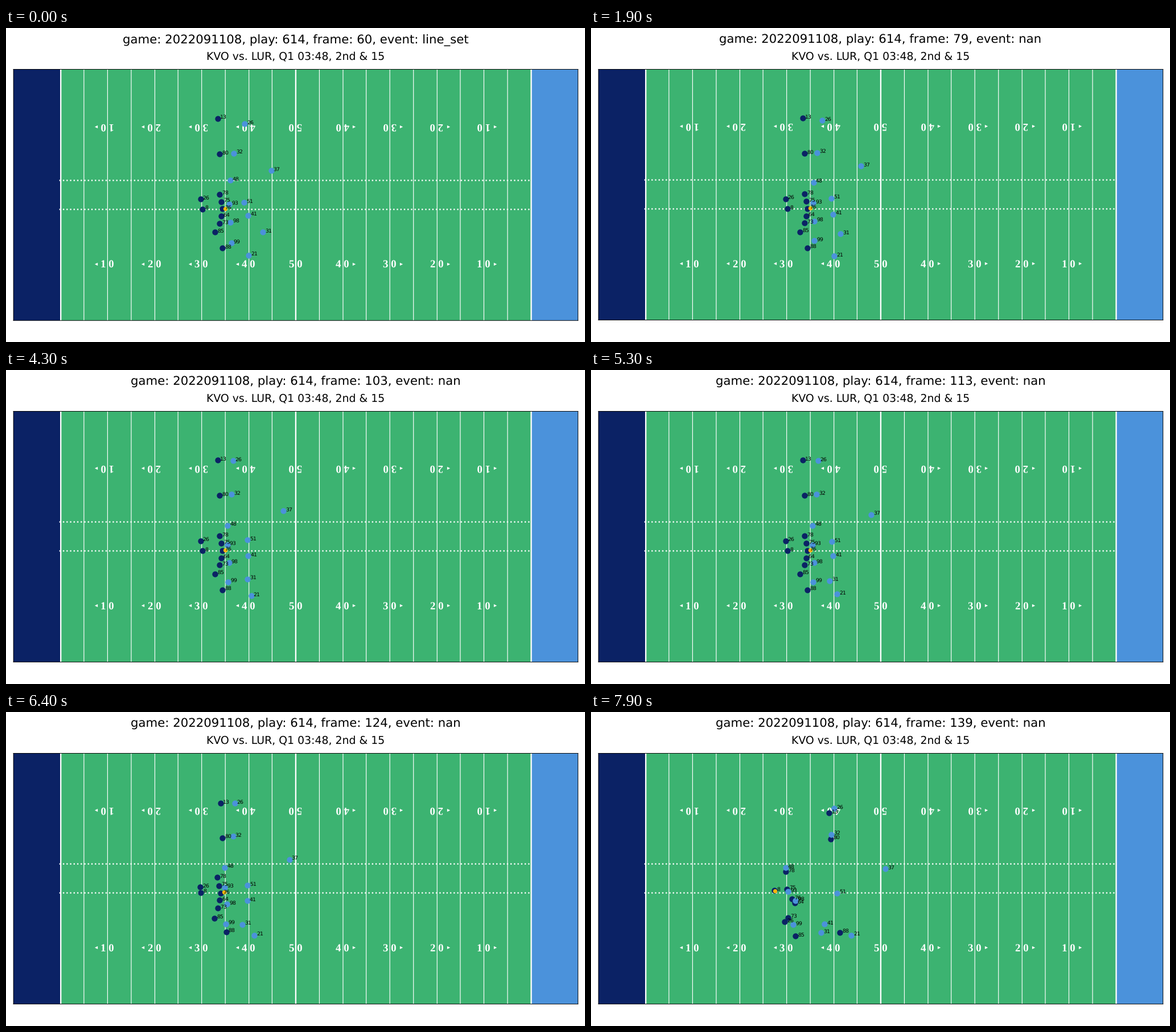
Recreate the animation shown at these times as a matplotlib script. Size 1017 px wide and 551 px high, loop 8000 ms.

```python
import numpy as np
import matplotlib.pyplot as plt
from matplotlib.animation import FuncAnimation

# Layout is worked out on a 1200 x 650 canvas and shown at 1017 x 551.
CANVAS_W, CANVAS_H, YARD = 1200, 650, 9.75
LEFT, BASE = 15, 44.75
LENGTH, WIDTH = 120, 53.3
DPI = 84.75
NAVY, BLUE, GREEN, GOLD = "#0B2265", "#4B92DB", "#3CB371", "#F4B60C"
FRAMES, STEP = 80, 100
BREAK, END = 5.9, 7.9
EVENTS = {0: "line_set", 62: "ball_snap", 70: "play_action"}
CLOCK = np.arange(FRAMES) * STEP / 1000

plt.rcParams["text.hinting"] = "none"


def grid(v):
    """Centre of the pixel a thin canvas line falls on."""
    return np.floor(v + 0.5) + 0.5


def track(*stops):
    """Drift through the stops before the snap, then speed up to the last one."""
    *drift, end = np.array(stops, float)
    times = 2.9 * np.arange(len(drift))
    spot = np.stack([np.interp(CLOCK, times, axis) for axis in np.transpose(drift)], 1)
    run = np.clip((CLOCK - BREAK) / (END - BREAK), 0, 1)[:, None] ** 1.6
    return spot + run * (end - drift[-1])


offense = {
    13: track((43.5, 42.95), (49.1, 40.65)),
    80: track((43.85, 35.4), (49.4, 35.15)),
    85: track((42.9, 18.8), (41.9, 14.5)),
    88: track((44.5, 15.4), (51.35, 15.3)),
    8: track((40.2, 23.7), (37.45, 24.15)),
    26: track((39.8, 25.8), (39.65, 17.55)),
}
# The five linemen stand in a shallow wedge around the centre.
pocket = {78: (39.9, 28.15), 75: (40.15, 24.5), 76: (41.2, 22.35),
          64: (41.8, 21.5), 73: (40.35, 18.45)}
for i, (number, end) in enumerate(pocket.items()):
    offense[number] = track((44.5 - 0.34 * abs(i - 2), 26.85 - 1.55 * i), end)

defense = {
    26: track((49.2, 41.8), (46.7, 42.8), (50.1, 41.6)),
    32: track((46.85, 35.55), (46.35, 35.65), (49.5, 36.1)),
    37: track((54.8, 31.85), (56.4, 33.25), (58.4, 31), (61, 28.8)),
    48: track((46.1, 29.8), (45.55, 29.1), (39.8, 29.05)),
    93: track((45.9, 24.75), (45.5, 24.95), (40.35, 23.95)),
    51: track((49.1, 25.1), (49.85, 26.4), (49.65, 25.5), (50.7, 23.65)),
    41: track((49.9, 22.4), (49.95, 22.6), (48.1, 17.05)),
    98: track((46.15, 20.95), (45.85, 21.15), (41.9, 22.05)),
    99: track((46.35, 16.5), (45.7, 17.1), (41.4, 16.95)),
    31: track((53, 18.8), (50.6, 18.15), (48.85, 17.2), (47.35, 15.2)),
    21: track((50, 13.9), (50.25, 13.55), (50.9, 14.7), (53.8, 14.7)),
}
# The ball flies from the centre to the passer and stays with him.
flight = np.clip((CLOCK - 6.3) / 0.5, 0, 1)[:, None] ** 2
ball = (1 - flight) * (45.05, 23.8) + flight * (offense[8] + (0.15, -0.08))

fig = plt.figure(figsize=(1017 / DPI, 551 / DPI), dpi=DPI, facecolor="white")
ax = fig.add_axes([0, 0, 1, 1], facecolor=GREEN)
ax.set(xticks=[], yticks=[])
for spine in ax.spines.values():
    spine.set_snap(False)

ax.axvspan(-1, 10, color=NAVY, lw=0, zorder=0.5)
ax.axvspan(110, 121, color=BLUE, lw=0, zorder=0.5)
for yards in range(10, 111, 5):
    ax.axvline((grid(LEFT + yards * YARD) - LEFT) / YARD, color="white", zorder=1,
               lw=2 if yards in (10, 60, 110) else 1, snap=False)
hashes = [(y, ax.plot([9.8, 110], [y, y], ":", color="white", lw=2, zorder=1,
                      snap=False)[0]) for y in (23.583, 29.75)]

for yards in range(20, 101, 10):
    value = min(yards, LENGTH - yards) - 10
    for mid, turn in ((12.08, 0), (WIDTH - 12.08, 180)):
        ax.text(yards, mid + (0.76 if turn else -0.76), " ".join(str(value)),
                color="white", size=16, family="Liberation Serif", weight="bold",
                ha="center", va="baseline", rotation=turn,
                rotation_mode="anchor", zorder=2)
        if yards != 60:
            side = np.sign(yards - 60)
            ax.scatter(yards + 2.45 * side, mid, s=20, color="white", lw=0,
                       marker="<" if side < 0 else ">", zorder=2)

ax.set_xlim((grid(LEFT) - LEFT) / YARD, (grid(LEFT + LENGTH * YARD) - LEFT) / YARD)


def dots(tracks, size, color, z):
    """Scatter plus an array of positions by frame and dot."""
    art = ax.scatter([], [], s=size ** 2, color=color, lw=0, zorder=z)
    return art, np.stack(list(tracks), 1)


groups = [dots(offense.values(), 8.8, NAVY, 3),
          dots(defense.values(), 8.8, BLUE, 4),
          dots([ball], 6.2, GOLD, 5)]
labels = [(ax.text(0, 0, str(number), size=8, zorder=6), path)
          for team in (offense, defense) for number, path in team.items()]

title = fig.text(0.5, 1 - 27 / 551, "", size=18, ha="center", va="baseline")
fig.text(0.5, 1 - 56 / 551, "KVO vs. LUR, Q1 03:48, 2nd & 15",
         size=16, ha="center", va="baseline")


def place_field(base):
    low, high = grid(base), grid(base + WIDTH * YARD)
    x0, x1 = grid(LEFT), grid(LEFT + LENGTH * YARD)
    ax.set_position([x0 / CANVAS_W, low / CANVAS_H,
                     (x1 - x0) / CANVAS_W, (high - low) / CANVAS_H])
    ax.set_ylim((low - base) / YARD, (high - base) / YARD)
    for y, line in hashes:
        line.set_ydata([(grid(base + y * YARD) - base) / YARD] * 2)


def update(i):
    event = EVENTS.get(i, "nan")
    title.set_text(f"game: 2022091108, play: 614, frame: {60 + i}, event: {event}")
    # An underscore makes the title taller and nudges the field down.
    place_field(BASE - 0.7 * ("_" in event))
    for art, spots in groups:
        art.set_offsets(spots[i])
    for label, path in labels:
        label.set_position(path[i] + (0.5, -0.06))
    return []


anim = FuncAnimation(fig, update, frames=FRAMES, interval=STEP,
                     repeat=True, repeat_delay=0, blit=False)
plt.show()
```
